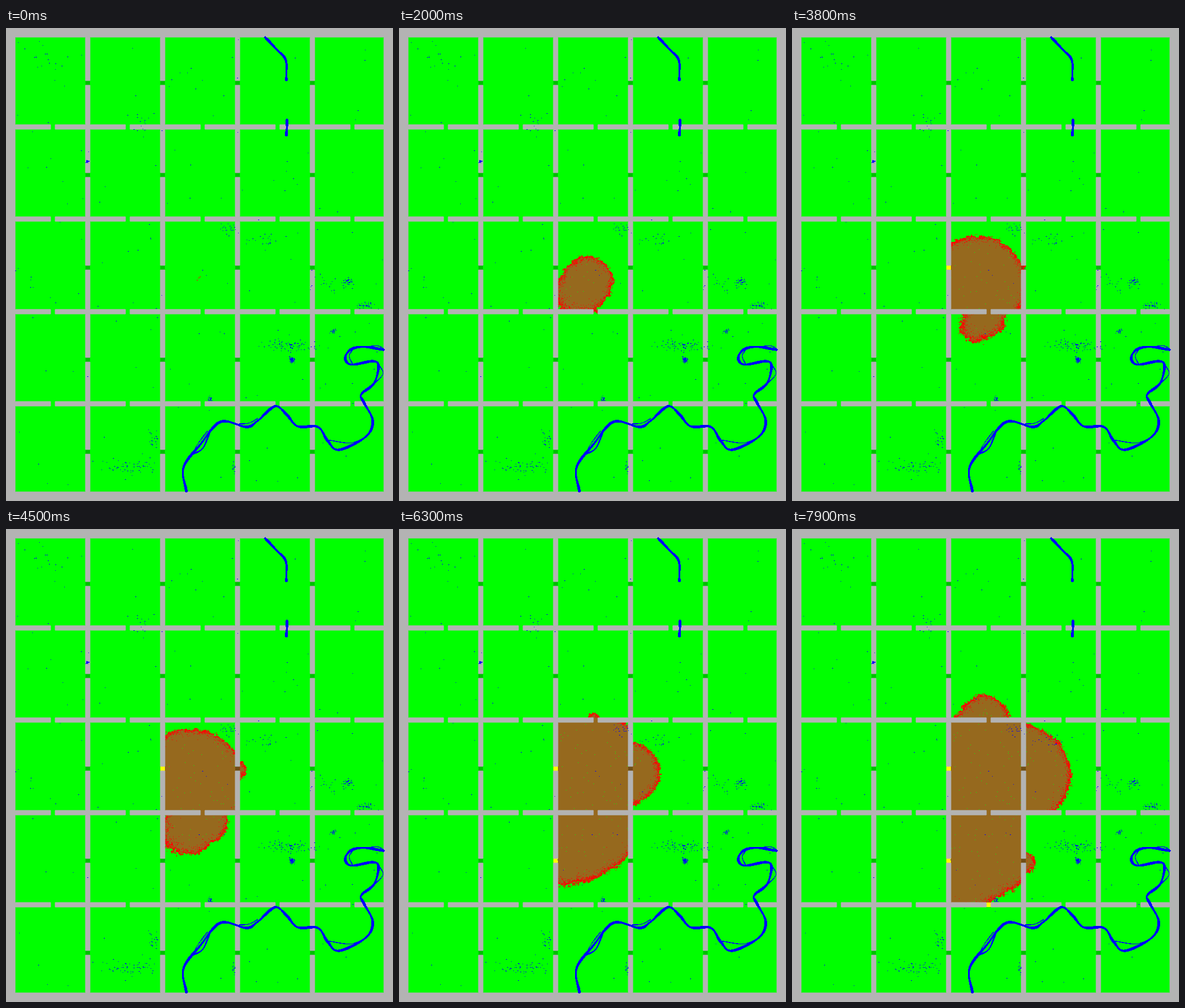
A matplotlib script that plays this animation: 677 by 827 pixels, repeating every 8 s.

```python
import numpy as np
import matplotlib.pyplot as plt
from matplotlib.animation import FuncAnimation

W, H, DPI = 677, 827, 64
FRAMES, STEP = 80, 100
GREEN, BLUE, GREY = (0, 255, 0), (0, 0, 255), (179, 179, 179)
RED, BROWN, YELLOW = (255, 0, 0), (150, 105, 30), (255, 255, 0)
SHADE = 0.75                            # passages through upright roads are darker
LEFT, TOP, RIGHT, BOTTOM, ROAD = 16, 16, 661, 811, 8

rng = np.random.default_rng(5)
yy, xx = np.mgrid[:H, :W]

# --- land: fields, roads and passages
k = np.arange(5)
col_x, gap_x = 139 + 131 * k[:4], 78 + 131 * k
row_y = np.round(169.3 + 161.2 * k[:4]).astype(int)
gap_y = np.round(92.2 + 161.2 * k).astype(int)


def square(x, y):
    return np.s_[y:y + ROAD, x:x + ROAD]


def field(col, row):
    xs, ys = [LEFT - ROAD, *col_x, RIGHT], [TOP - ROAD, *row_y, BOTTOM]
    return np.s_[ys[row] + ROAD:ys[row + 1], xs[col] + ROAD:xs[col + 1]]


soil = np.zeros((H, W), bool)
tint = np.ones((H, W, 1))
for row in range(5):
    for col in range(5):
        soil[field(col, row)] = True
for x in col_x:
    for y in gap_y:
        soil[square(x, y)] = True
        tint[square(x, y)] = SHADE
for y in row_y:
    for x in gap_x:
        soil[square(x, y)] = True

# soft one-pixel rim where soil meets road
inner = soil.copy()
for axis in (0, 1):
    for step in (-1, 1):
        inner &= np.roll(soil, step, axis)
rim = soil & ~inner

# --- water
water = np.zeros((H, W), bool)


def curve(points, n=40):
    """Catmull-Rom curve through the points."""
    p = np.array(points, float)
    p = np.vstack([2 * p[0] - p[1], p, 2 * p[-1] - p[-2]])
    u = np.linspace(0, 1, n, endpoint=False)[:, None]
    return np.vstack([
        0.5 * (2 * b + (c - a) * u + (2 * a - 5 * b + 4 * c - d) * u**2
               + (3 * b - a - 3 * c + d) * u**3)
        for a, b, c, d in zip(p, p[1:], p[2:], p[3:])])


def stream(points, width):
    for i, (x, y) in enumerate(curve(points)):
        r = width / 2 * (1 + 0.2 * np.sin(i / 9))
        box = np.s_[int(y) - 4:int(y) + 6, int(x) - 4:int(x) + 6]
        water[box] |= np.hypot(xx[box] - x, yy[box] - y) <= r


stream([(453, 16), (473, 37), (489, 56), (490, 91)], 4)
stream([(491, 160), (491, 173), (490, 187)], 4.4)
stream([(660, 562), (625, 557), (602, 562), (593, 577), (604, 588), (642, 582),
        (651, 592), (643, 621), (621, 640), (626, 655), (641, 686), (629, 714),
        (582, 737), (562, 721), (545, 697), (510, 696), (490, 675), (470, 661),
        (440, 686), (420, 697), (375, 688), (340, 727), (310, 768), (315, 810)], 4.2)
stream([(356, 707), (344, 734), (328, 744)], 2.4)
for side in ([(405, 692), (425, 690), (440, 682)], [(352, 704), (335, 727), (325, 746)],
             [(563, 720), (600, 725), (622, 719)], [(652, 588), (659, 604), (645, 620)],
             [(625, 558), (648, 555), (660, 560)], [(610, 558), (600, 572), (606, 588)]):
    stream(side, 1.4)


def specks(x, y, sx, sy, n):
    for px, py in zip(rng.normal(x, sx, n).astype(int), rng.normal(y, sy, n).astype(int)):
        if LEFT <= px < RIGHT - 1 and TOP <= py < BOTTOM:
            water[py, px:px + rng.integers(1, 3)] = True


# ponds and marshes: x, y, spread, number
for marsh in [(142, 234, 1.5, 1.5, 26), (500, 580, 2.5, 2.2, 80), (599, 443, 5, 2.5, 36),
              (573, 530, 2.4, 2, 26), (628, 484, 8, 3, 40), (570, 450, 18, 8, 24),
              (495, 556, 22, 5, 80), (388, 348, 8, 5, 20), (455, 374, 18, 6, 22),
              (215, 765, 24, 8, 55), (255, 720, 7, 9, 20), (398, 770, 1.5, 6, 18),
              (235, 165, 7, 14, 12), (75, 60, 15, 30, 14), (355, 649, 2.4, 2, 18)]:
    specks(*marsh)
for _ in range(150):
    specks(rng.uniform(LEFT, RIGHT), rng.uniform(TOP, BOTTOM), 0.3, 0.3, 1)

# --- fire: the step at which each cell catches


def smooth(size):
    """Noise blurred over a square window, with unit deviation."""
    a = rng.normal(size=(H, W))
    for axis in (0, 1):
        a = sum(np.roll(a, s, axis) for s in range(size))
    return a / a.std()


noise = 0.5 * smooth(13) + 0.6 * smooth(4) + 0.45 * rng.normal(size=(H, W))
WIND = np.radians(138)                  # to the lower left
arrive = np.full((H, W), np.inf)


def speed(dx, dy):
    """Pixels per step, by heading against the wind."""
    c = (1 + np.cos(np.arctan2(dy, dx) - WIND)) / 2
    return 1.85 + 0.7 * c + 1.1 * c**8


def ignite(x, y, start, area, passage=None):
    """Spread from a point over a field, and back over the passage it came by."""
    dx, dy = xx[area] - x, yy[area] - y
    r = np.hypot(dx, dy)
    t = r / speed(dx, dy) + noise[area] * np.minimum(1, r / 12)
    arrive[area] = start + np.maximum(t, 0.3)
    if passage:
        r = np.hypot(xx[passage] - x, yy[passage] - y)
        arrive[passage] = start - r / 2.2 + 0.5 * noise[passage]


ignite(335, 439, -0.3, field(2, 2))
ignite(343, 500, 22, field(2, 3), square(gap_x[2], row_y[2]))
ignite(409, 419, 39, field(3, 2), square(col_x[2], gap_y[2]))
ignite(341, 330, 59, field(2, 1), square(gap_x[2], row_y[1]))
ignite(409, 580, 71, field(3, 3), square(col_x[2], gap_y[3]))

# passages that close as the fire comes up to them
closed = [(square(col_x[1], y), arrive[y:y + ROAD, col_x[1] + ROAD].min())
          for y in gap_y[2:4]]
closed.append((square(gap_x[2], row_y[3]),
               arrive[row_y[3] - 1, gap_x[2]:gap_x[2] + ROAD].min()))

arrive = np.maximum(arrive, 1)
for x, y in [(337, 436), (339, 434), (334, 440)]:
    arrive[y:y + 2, x] = 0
arrive[water | (rng.random((H, W)) < 0.003)] = np.inf
burnt = arrive + 0.9 + rng.exponential(1.3, (H, W))


def picture(t):
    img = np.where(soil[..., None], GREEN, GREY) * tint
    img[arrive <= t] = RED
    done = burnt <= t
    img[done] = BROWN * tint[done]
    for box, start in closed:
        if t >= start:
            img[box] = YELLOW
    img[rim] = (img[rim] + GREY) / 2
    img[water] = BLUE
    return img.astype(np.uint8)


fig = plt.figure(figsize=(W / DPI, H / DPI), dpi=DPI)
ax = fig.add_axes([0, 0, 1, 1])
ax.axis("off")
view = ax.imshow(picture(0), interpolation="nearest", aspect="auto")


def update(i):
    view.set_data(picture(i))
    return [view]


anim = FuncAnimation(fig, update, frames=FRAMES, interval=STEP, repeat=True,
                     repeat_delay=0, blit=False)
plt.show()
```
